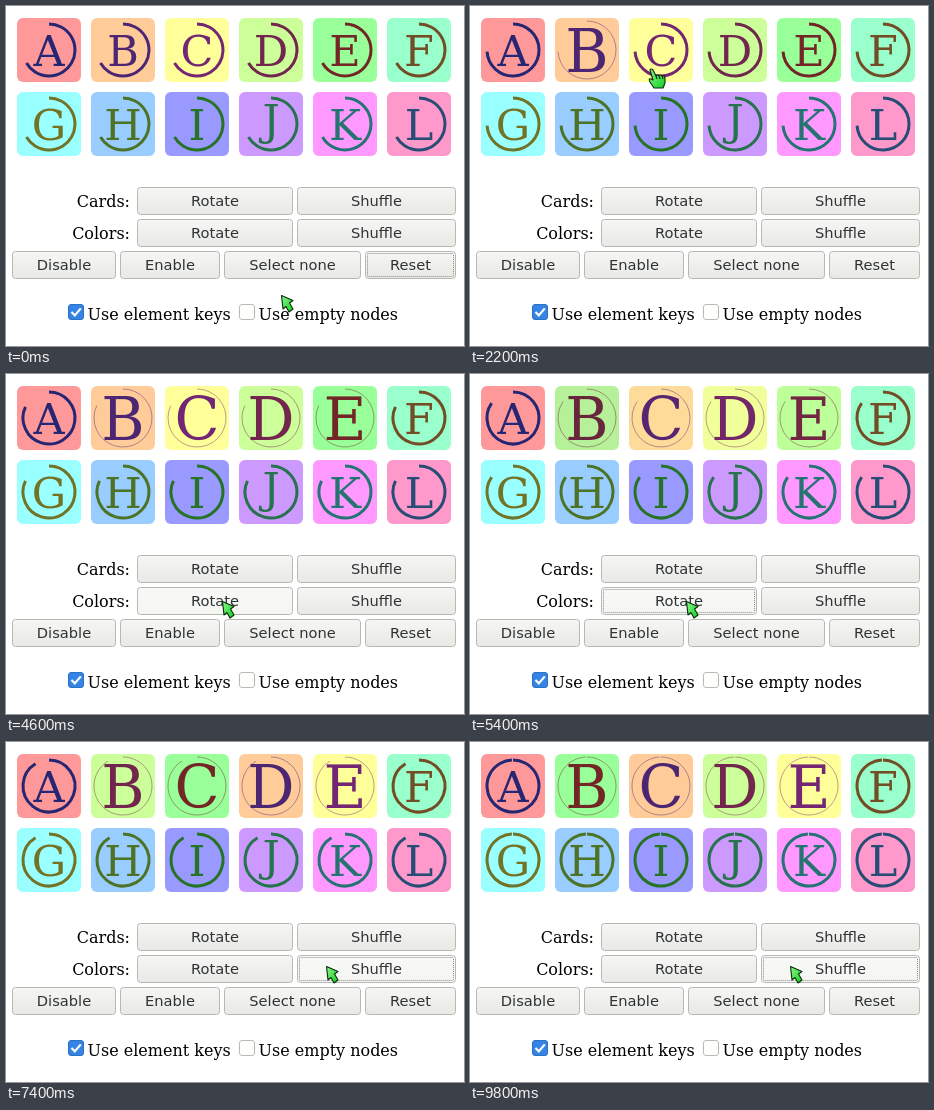
Write an HTML page that moves like this. It is 458x340 px and loops after 10000 ms.

```html
<!DOCTYPE html>
<html lang="en">
<head>
<meta charset="utf-8">
<title>Cards</title>
<style>
  html, body { margin: 0; width: 100%; height: 100%; overflow: hidden; background: #fff; }
  svg { display: block; width: 458px; height: 340px; }
  .serif { font-family: "DejaVu Serif", serif; }
  .label { font-size: 16px; fill: #000; }
  .button { font: 14.667px "DejaVu Sans", sans-serif; fill: #2e3436; text-anchor: middle; }
</style>
</head>
<body>
<svg id="stage" viewBox="0 0 458 340">
  <defs>
    <linearGradient id="face" x2="0" y2="1">
      <stop offset="0" stop-color="#f6f6f4"/><stop offset="1" stop-color="#e8e8e5"/>
    </linearGradient>
    <linearGradient id="hover" x2="0" y2="1">
      <stop offset="0" stop-color="#f8f8f6"/><stop offset="1" stop-color="#f5f5f2"/>
    </linearGradient>
    <linearGradient id="green" x2="1" y2="1">
      <stop offset="0" stop-color="#8cf58c"/><stop offset="1" stop-color="#10d020"/>
    </linearGradient>
  </defs>
</svg>
<script>
const LOOP = 10000, TICK = 200;
const stage = document.getElementById('stage');

function set(node, attrs) {
  for (const key in attrs) node.setAttribute(key, attrs[key]);
  return node;
}

function add(tag, attrs, parent = stage, text = '') {
  const node = set(document.createElementNS('http://www.w3.org/2000/svg', tag), attrs);
  node.textContent = text;
  return parent.appendChild(node);
}

const clamp = v => Math.max(0, Math.min(1, v));
const mix = (a, b, p) => a + (b - a) * p;
const ease = p => p * p * (3 - 2 * p);

function hsl(hue, sat, light) {
  const a = sat * Math.min(light, 1 - light);
  return [0, 8, 4].map(n => {
    const k = (n + hue / 30) % 12;
    return 255 * (light - a * Math.max(-1, Math.min(k - 3, 9 - k, 1)));
  });
}
const blend = (a, b, p) => `rgb(${a.map((v, i) => Math.round(mix(v, b[i], p)))})`;

const paper = id => hsl(id * 30, 1, 0.8);
const ink = id => hsl((id * 30 + 240) % 360, 0.5, 0.3);

// Cards
const cards = [...'ABCDEFGHIJKL'].map((letter, i) => {
  const x = 11 + 74 * (i % 6), y = 12 + 74 * Math.floor(i / 6);
  return {
    letter, x, y, cx: x + 32, cy: y + 32,
    back: add('rect', { x, y, width: 64, height: 64, rx: 6 }),
    ring: add('path', { fill: 'none' }),
    text: add('text', { class: 'serif', x: x + 32, 'text-anchor': 'middle' }, stage, letter)
  };
});

const selectTime = { B: 1600, C: 2400, D: 3000, E: 3600 };
const SELECT = 400, FADE = 700;

// Colour order of the selected cards B to E after each click
const orders = [
  [0, '1234'], [4900, '4123'], [5740, '3412'],
  [7400, '3421'], [8200, '3142'], [9000, '4132']
];

function colorsOf(i, t) {
  if (i < 1 || i > 4) return [i, i, 1];
  let n = 0;
  while (n + 1 < orders.length && orders[n + 1][0] <= t) n++;
  const to = +orders[n][1][i - 1];
  return n ? [+orders[n - 1][1][i - 1], to, clamp((t - orders[n][0]) / FADE)] : [to, to, 1];
}

function arc(cx, cy, r, degrees) {
  const a = degrees * Math.PI / 180;
  const x = cx + r * Math.sin(a), y = cy - r * Math.cos(a);
  return `M${cx} ${cy - r}A${r} ${r} 0 ${degrees > 180 ? 1 : 0} 1 ${x} ${y}`;
}

function drawCard(card, i, t) {
  const picked = ease(clamp((t - (selectTime[card.letter] ?? Infinity)) / SELECT));
  const [from, to, p] = colorsOf(i, t);
  const color = blend(ink(from), ink(to), p);
  const size = mix(43, 59, picked);
  const rise = card.letter === 'J' ? 0.265 : 0.3645;
  set(card.back, { fill: blend(paper(from), paper(to), p) });
  set(card.ring, {
    d: arc(card.cx, card.cy, mix(26, 29, picked), 240 + 12 * t / 1000),
    stroke: color, 'stroke-width': mix(3, 1, picked), 'stroke-opacity': mix(1, 0.45, picked)
  });
  set(card.text, { y: card.cy + size * rise, 'font-size': size, fill: color });
}

// Controls
function makeButton(label, x, y, right) {
  const w = right - x;
  const face = add('rect', {
    x: x + 0.5, y: y + 0.5, width: w - 1, height: 27, rx: 3, stroke: '#b8b8b3'
  });
  const focus = add('rect', {
    x: x + 2.5, y: y + 2.5, width: w - 5, height: 23, rx: 1,
    fill: 'none', stroke: '#8a8a88', 'stroke-dasharray': '1 1'
  });
  add('text', { class: 'button', x: x + w / 2, y: y + 19 }, stage, label);
  return { x, y, right, face, focus };
}

function label(text, x, y, anchor = 'start') {
  add('text', { class: 'serif label', x, y, 'text-anchor': anchor }, stage, text);
}

label('Cards:', 124, 201, 'end');
label('Colors:', 124, 233, 'end');
makeRow();
const buttons = makeRow.buttons;

function makeRow() {
  makeRow.buttons = [
    ['Rotate', 131, 181, 287], ['Shuffle', 291, 181, 450],
    ['Rotate', 131, 213, 287], ['Shuffle', 291, 213, 450],
    ['Disable', 6, 245, 110], ['Enable', 114, 245, 214],
    ['Select none', 218, 245, 355], ['Reset', 359, 245, 450]
  ].map(args => makeButton(...args));
}

add('rect', { x: 62.5, y: 298.5, width: 15, height: 15, rx: 2.5, fill: '#3584e4', stroke: '#2a70c8' });
add('path', {
  d: 'M65.5 306l3.3 3.4 6-7', fill: 'none', stroke: '#fff', 'stroke-width': 2.2
});
label('Use element keys', 81.5, 314);
add('rect', { x: 233.5, y: 298.5, width: 15, height: 15, rx: 2.5, fill: '#fff', stroke: '#bfb8b1' });
label('Use empty nodes', 252.5, 314);

function focusedButton(t) {
  if (t < 1600) return 7;
  if (t < 4900) return -1;
  return t < 7400 ? 2 : 3;
}

// Pointer
const skin = { fill: 'url(#green)', stroke: '#0a2a0a', 'stroke-width': 1.1, 'stroke-linejoin': 'round' };
const arrow = add('path', { ...skin, d: 'M.5 .5L12 5.5 8.5 8 12 14 8 17 5 11.5 2 14Z' });
const hand = add('path', {
  ...skin,
  d: 'M-2 1Q-1-1 1 1L4 7Q6 5 7 7Q9 5 10 7Q12 6 13 9L13 14 11 19H2L-2 13Q-4 9-1 10L1 11Z' +
     'M4 7l1 3M7 7l1 3M10 7l1 3'
});

const route = [
  [0, 275, 289], [500, 285, 322], [1200, 135, 80], [1500, 125, 58], [1800, 125, 58],
  [2200, 182, 63], [2500, 186, 61], [2900, 258, 59], [3200, 260, 59],
  [3500, 330, 60], [3800, 328, 64], [4500, 216, 227], [5400, 216, 227],
  [6000, 219, 230], [6500, 219, 230], [7200, 320, 224], [LOOP, 320, 224]
];

function pointerAt(t) {
  const n = route.findIndex(stop => stop[0] > t);
  const [t0, x0, y0] = route[n - 1], [t1, x1, y1] = route[n];
  const p = ease((t - t0) / (t1 - t0));
  return [mix(x0, x1, p), mix(y0, y1, p)];
}

const inside = (x, y, left, top, right, bottom) =>
  x >= left && x < right && y >= top && y < bottom;

function draw(t) {
  cards.forEach((card, i) => drawCard(card, i, t));

  const [x, y] = pointerAt(t);
  const focused = focusedButton(t);
  buttons.forEach((b, i) => {
    const over = inside(x, y, b.x, b.y, b.right, b.y + 28);
    set(b.face, { fill: over ? 'url(#hover)' : 'url(#face)' });
    set(b.focus, { visibility: i === focused ? 'visible' : 'hidden' });
  });

  const onCard = cards.some(c => inside(x, y, c.x, c.y, c.x + 64, c.y + 64));
  const transform = `translate(${Math.round(x)} ${Math.round(y)})`;
  set(arrow, { transform, visibility: onCard ? 'hidden' : 'visible' });
  set(hand, { transform, visibility: onCard ? 'visible' : 'hidden' });
}

const start = performance.now();
function frame() {
  const t = (performance.now() - start) % LOOP;
  draw(Math.floor(t / TICK) * TICK);
  requestAnimationFrame(frame);
}
frame();
</script>
</body>
</html>
```
